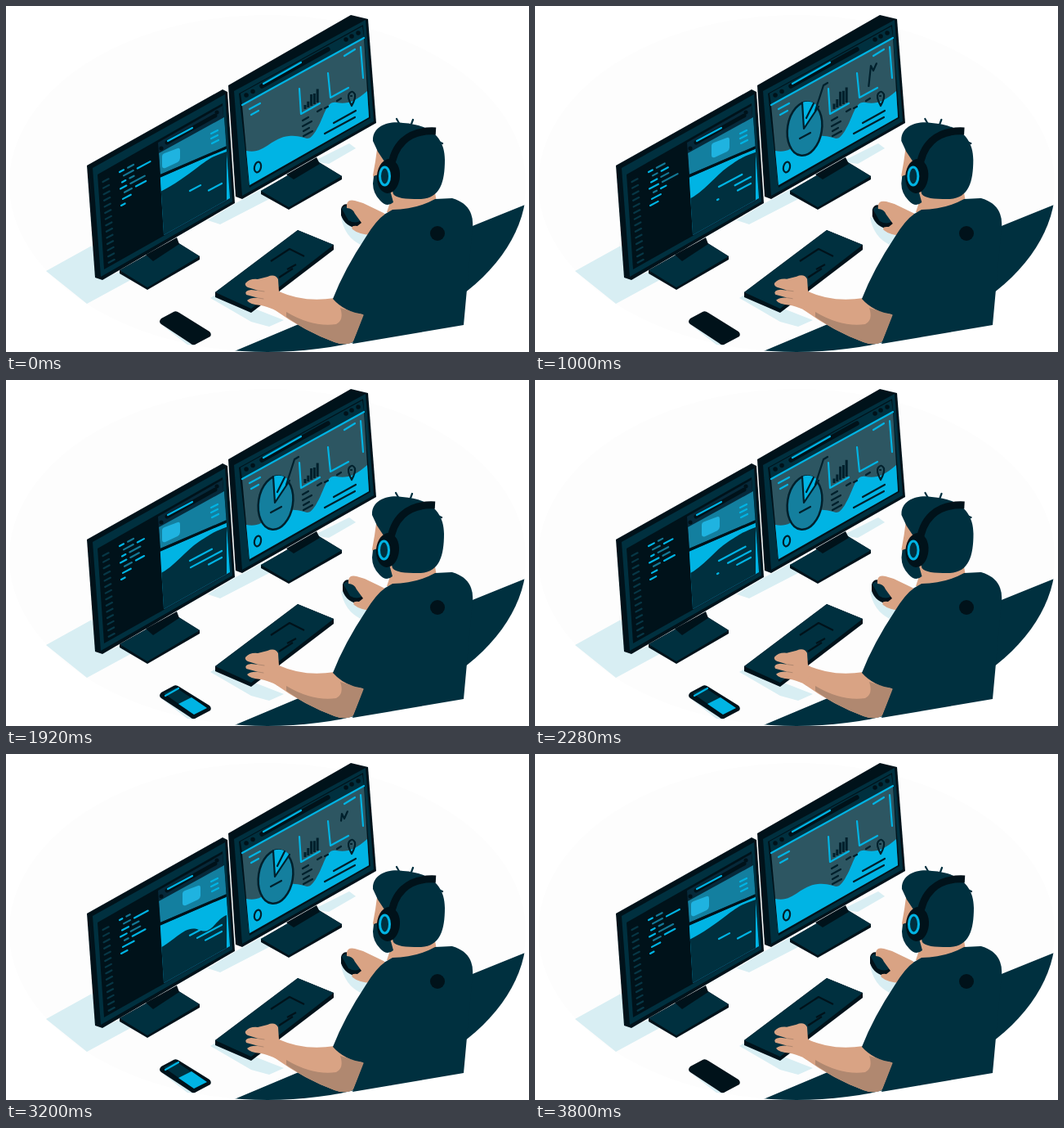
An HTML page that plays this animation: 640 by 423 pixels, repeating every 3.84 s.

```html
<!DOCTYPE html>
<html lang="en">
<head>
<meta charset="utf-8">
<title>Desk work</title>
<style>
html, body { margin: 0; width: 100%; height: 100%; overflow: hidden; background: #fff; }
svg { display: block; width: 640px; height: 423px; }
.navy { fill: #00303f; } .ink { fill: #00121a; } .cyan { fill: #00b4e4; }
.pale { fill: #d8eef3; } .skin { fill: #d9a384; } .shade { fill: #b08870; }
.line { fill: none; stroke: #00b4e4; stroke-width: 2.2; stroke-linecap: round; stroke-linejoin: round; }
.dark { stroke: #00202c; }
</style>
</head>
<body>
<svg viewBox="0 0 640 423">
  <defs>
    <clipPath id="oval"><ellipse cx="320" cy="217" rx="317" ry="206"/></clipPath>
    <clipPath id="pane"><path d="M187 180 267 136 274 235 193 280Z"/></clipPath>
  </defs>
  <ellipse cx="320" cy="217" rx="316" ry="206" fill="#fdfdfd"/>

  <g class="pale">
    <path d="M49 324 105 293 118 334 145 322 158 332 99 364Z"/>
    <path d="M205 287 283 240 313 224 326 234 262 267 247 262 222 277Z"/>
    <path d="M376 190 420 168 428 174 395 193Z"/>
    <path d="M250 357 258 352 340 384 322 392 300 386Z"/>
    <path d="M188 388 230 415 222 414Z"/>
    <path d="M410 258Q414 282 434 292L446 280 420 262Z"/>
  </g>

  <!-- left monitor -->
  <path class="ink" d="M139 323 205 286 237 306V310L173 347 139 327Z"/>
  <path class="navy" d="M139 323 205 286 237 306 173 344Z"/>
  <path class="ink" d="M171 304 209 283 212 291 180 312Z"/>
  <path class="ink" d="M99 195 265 102 271 105 280 241 118 335 109 332Z"/>
  <path class="navy" d="M106 198 268 108 277 239 116 331Z"/>
  <path class="ink" d="M112 206 265 119 273 236 120 322Z"/>
  <path fill="#06293a" d="M186 167 265 122 274 237 194 281Z"/>
  <path class="line" style="stroke:#00121a;stroke-width:5" d="M197 167 256 134M190 174h.1M258 130h.1"/>
  <path class="line" d="M198 165 228 149"/>
  <path id="ticks" class="line" style="stroke:#073746"/>
  <path id="codeDim" class="line" style="stroke:#137895"/>
  <path id="code" class="line"/>
  <g clip-path="url(#pane)">
    <path fill="#137f9f" d="M187 179 267 135 270 171 189 206Z"/>
    <path class="cyan" d="M188 210 270 174 275 240 193 284Z"/>
    <path id="slope" class="navy"/>
    <path class="line" style="stroke:#00121a;stroke-width:3" d="M188 208 270 173"/>
    <path id="card" fill="#1fb3e0" d="M191 184Q191 181 194 180L210 174Q213 173 213 177V186Q213 189 210 191L195 198Q191 199 191 195Z"/>
    <path class="line" d="M251 156 259 152M251 162 259 158M252 168 260 164"/>
    <path id="notes" class="line"/>
  </g>

  <!-- right monitor -->
  <path class="ink" d="M312 226 378 188 411 208V212L346 249 312 230Z"/>
  <path class="navy" d="M312 226 378 188 411 208 346 246Z"/>
  <path class="ink" d="M343 206 380 185 384 193 352 212Z"/>
  <path class="ink" d="M272 97 422 11 443 16 453 143 289 236 281 233Z"/>
  <path class="navy" d="M279 104 440 17 450 141 289 232Z"/>
  <path class="ink" d="M285 107 437 23 446 137 298 222Z"/>
  <path class="navy" d="M287 107 436 25 438 38 289 120Z"/>
  <path fill="#2d5662" d="M289 121 438 39 444 136 298 219Z"/>
  <path class="cyan" d="M294 177C316 182 324 161 346 159S368 170 379 153 391 116 404 118 426 118 442 104L444 136 298 219Z"/>
  <path class="line" d="M289 121 438 39"/>
  <path class="line" style="stroke:#00121a;stroke-width:5.5" d="M313 98 394 53M294 109h.1M302 104.500h.1M416 41h.1M423 37h.1M431 33h.1"/>
  <path class="line" d="M315 95 361 69M298 126 311 119M300 133 309 128M414 61 427 53M434 50 437 88M359 101 361 132 384 119M394 82 397 112 419 100"/>
  <path class="line dark" d="M363 140 370 136M363 147 374 141M364 153 371 149M364 159 375 153M381 129 386 126M390 125 394 123M405 116 410 113M390 156 427 136M401 143 428 128"/>
  <path class="line dark" d="M423 122Q417 111 420 107 424 102 427 108 428 113 423 122ZM422 110h1"/>
  <ellipse class="line dark" cx="308" cy="197" rx="4" ry="6.500" transform="rotate(12 308 197)"/>
  <path id="bars" class="line dark" style="stroke-linecap:butt;stroke-width:3"/>
  <path id="trend" class="line dark" d="M399 106 404 96 408 101 411 73 414 79 418 70"/>
  <g id="pie">
    <ellipse cx="330" cy="150" rx="21" ry="33" transform="rotate(9 330 150)" fill="#147f9e" stroke="#00202c" stroke-width="2.500"/>
    <path class="cyan" d="M329 150 327 118Q340 114 347 124Z"/>
    <path class="line dark" d="M327 118 329 150 347 123M332 137 341 119M324 162 337 155"/>
  </g>
  <path id="callout" class="line dark" d="M343 128 353 97 358 94"/>

  <!-- keyboard and phone -->
  <path class="ink" d="M256 350 357 274 401 292V298L300 375 256 356Z"/>
  <path class="navy" d="M256 350 357 274 401 292 300 370Z"/>
  <path class="line dark" style="stroke:#00121a;stroke-linecap:butt" d="M324 312 347 297 365 306M344 322 355 316M334 332 351 321"/>
  <path class="ink" d="M190 382 205 374Q208 372 212 375L249 398Q252 401 250 404L233 413Q229 416 225 412L190 389Q186 386 190 382Z"/>
  <g id="phone">
    <path class="navy" d="M193 383 208 376 245 401 230 409Z"/>
    <path class="cyan" d="M211 396 227 388 246 401 230 409Z"/>
    <path class="line" d="M195 386 211 377"/>
  </g>

  <!-- person -->
  <path class="navy" clip-path="url(#oval)" d="M640 241 541 281 420 363 270 426H640Z"/>
  <g id="mouse">
    <path class="ink" d="M410 248Q412 240 421 243L436 258Q440 270 431 272 415 270 410 256Z"/>
    <path class="navy" d="M411 248Q414 242 421 246L434 262Q428 267 419 262Z"/>
    <path class="skin" d="M417 243Q418 236 427 238L437 241 462 253 468 258 447 280Q431 279 424 273 421 268 430 269L435 265 427 254Q424 247 417 247Z"/>
  </g>
  <path class="skin" d="M334 349Q365 363 402 357L438 378 425 410Q416 416 402 411 366 398 328 371Z"/>
  <path class="shade" d="M343 374Q375 393 404 389 414 384 409 369L438 378 425 410Q416 416 402 411 368 398 343 380Z"/>
  <g id="hand">
    <path class="skin" d="M293 339Q298 333 308 334L320 331Q329 327 333 334L334 349 341 354 330 372Q318 367 312 366 298 365 295 360 300 356 309 357L294 353Q291 348 300 347L309 348 296 344Q292 342 293 339Z"/>
    <path class="line" style="stroke:#b08870;stroke-width:1" d="M309 348 316 349M309 357 315 358"/>
  </g>
  <path class="skin" d="M474 228 524 222 527 240 500 256 466 252Z"/>
  <path class="navy" d="M466 253Q454 260 440 283 414 322 400 358 414 374 438 377L424 413 560 390 571 270Q573 243 546 235L525 236Q502 249 473 249Z"/>
  <circle class="ink" cx="528" cy="278" r="9"/>
  <g id="head">
    <path class="skin" d="M455 168 452 190 449 207 458 230 474 240 500 236 490 170Z"/>
    <path class="navy" d="M450 208Q459 204 466 211L474 240Q466 247 458 238 449 229 449 217Z"/>
    <path class="navy" d="M449 165C448 147 468 140 486 143 518 145 537 160 537 188 537 216 531 236 506 236 488 236 478 235 474 230L463 190 455 178Z"/>
    <path class="line dark" style="stroke:#00303f" d="M478 138 482 145M498 139 495 147M527 165 534 168"/>
    <path fill="none" stroke="#00121a" stroke-width="9" d="M471 199C474 172 490 151 526 153"/>
    <ellipse class="ink" cx="468" cy="208" rx="14" ry="21" transform="rotate(5 468 208)"/>
    <ellipse class="line" cx="463.500" cy="208" rx="6" ry="11" style="stroke-width:3;fill:#00303f"/>
  </g>
</svg>
<script>
const LOOP = 3840;
const $ = id => document.getElementById(id);
const move = (id, x, y) => $(id).setAttribute("transform", `translate(${x} ${y})`);
const draw = (id, d) => $(id).setAttribute("d", d);
const wave = (t, cycles, phase = 0) => Math.sin(2 * Math.PI * cycles * t / LOOP + phase);

// Eased interpolation through time, value pairs
function keys(t, ...k) {
  for (let i = 0; i + 3 < k.length; i += 2) {
    if (t <= k[i + 2]) {
      const p = Math.max(0, (t - k[i]) / (k[i + 2] - k[i]));
      return k[i + 1] + (k[i + 3] - k[i + 1]) * p * p * (3 - 2 * p);
    }
  }
  return k[k.length - 1];
}

const slant = (x, y, w) => w < 0.5 ? "" : `M${x} ${y}l${w} ${-0.53 * w}`;

function stroke(id, tail, head) {
  const style = $(id).style;
  style.strokeDasharray = `${Math.max(0, head - tail)} 200`;
  style.strokeDashoffset = -tail;
  style.opacity = head - tail > 0.3 ? 1 : 0;
}

function drawCode(t) {
  let bright = "", dim = "";
  for (let i = 0; i < 7; i++) {
    const x = 139 + i * 5 % 7, y = 203 + 7 * i - 0.53 * (x - 139);
    const grow = 0.72 + 0.28 * wave(t, 2, i * 1.9);
    const a = (7 + i * 5 % 9) * grow, gap = a + 5;
    const b = (10 + i * 7 % 11) * (0.7 + 0.3 * wave(t, 1, i * 2.3));
    const first = slant(x, y, a), second = slant(x + gap, y - 0.53 * gap, b);
    if (i % 3 == 1) { dim += first; bright += second; }
    else { bright += first; if (i < 5) dim += second; }
  }
  draw("code", bright);
  draw("codeDim", dim);
}

function render(t) {
  drawCode(t);

  const left = keys(t, 0, 228, 560, 237, 3200, 238, 3800, 228);
  const right = keys(t, 0, 178, 2640, 180, 3200, 197, 3700, 178);
  draw("slope", `M187 ${left}C207 ${left - 10} 220 208 236 ${right + 18}S256 ${right + 5} 270 ${right}V285H187Z`);
  move("card", ...(x => [x, -0.52 * x])(
    keys(t, 0, 0, 450, 25, 1150, 25, 1550, 0, 2050, 0, 2500, 25, 3250, 25, 3650, 0)));

  const long = keys(t, 0, 13, 560, 38, 1400, 20, 1920, 27, 2640, 38, 3200, 28, 3800, 13);
  const extra = keys(t, 560, 0, 1400, 36, 1920, 38, 2640, 18, 3200, 30, 3700, 0);
  const low = keys(t, 0, 16, 1920, 16, 3200, 20, 3800, 16);
  draw("notes", slant(225, 221 + keys(t, 0, 5, 560, 0, 3000, 0, 3800, 5), long) +
    slant(264 - extra, 209 + 0.53 * extra, extra) +
    slant(264 - low, 217 + 0.53 * low, low) +
    slant(223, 237, keys(t, 0, 0, 560, 17, 1100, 0, 2200, 0, 2640, 16, 3200, 0)));

  let bars = "";
  for (let i = 0; i < 5; i++) {
    const h = 5 + i * 2.3 + (i == 2 ? 4 : 0) + (i + 1) * (0.7 - 0.7 * wave(t, 2, 1.57 + i * 0.3));
    bars += `M${366 + i * 3.8} ${126 - i * 2}v${-h}`;
  }
  draw("bars", bars);

  const p = t % (LOOP / 2);
  stroke("trend", keys(p, 640, 0, 720, 4, 1280, 37, 1400, 45, 1600, 62),
    keys(p, 400, 0, 560, 18, 720, 32, 1000, 62));
  stroke("callout", 0, keys(t, 560, 0, 950, 39, 2450, 39, 2640, 32, 2900, 0));

  const size = keys(t, 80, 0, 500, 1, 3260, 1, 3680, 0);
  $("pie").setAttribute("transform", `translate(330 150) scale(${size}) translate(-330 -150)`);

  $("phone").style.display = t >= 1600 && t < 3500 ? "" : "none";
  move("mouse", keys(t, 0, 0, 500, 4, 1400, 2, 2640, 2, 3200, 0),
    keys(t, 560, 0, 1400, 2, 2640, 2, 3200, 0));
  move("hand", keys(t, 0, 0, 560, -1, 1400, 1, 1920, 0), 0.7 * wave(t, 6));
  move("head", keys(t, 0, 0, 560, -1.5, 1400, 0, 1920, -1, 2640, 0, 3200, 0, 3500, -0.5, 3840, 0), 0);
}

let ticks = "";
for (let i = 0; i < 14; i++) ticks += slant(118.5 + i * 0.55, 215 + i * 7.6, 7);
draw("ticks", ticks);

function frame() {
  render(performance.now() % LOOP);
  requestAnimationFrame(frame);
}
frame();
</script>
</body>
</html>
```
